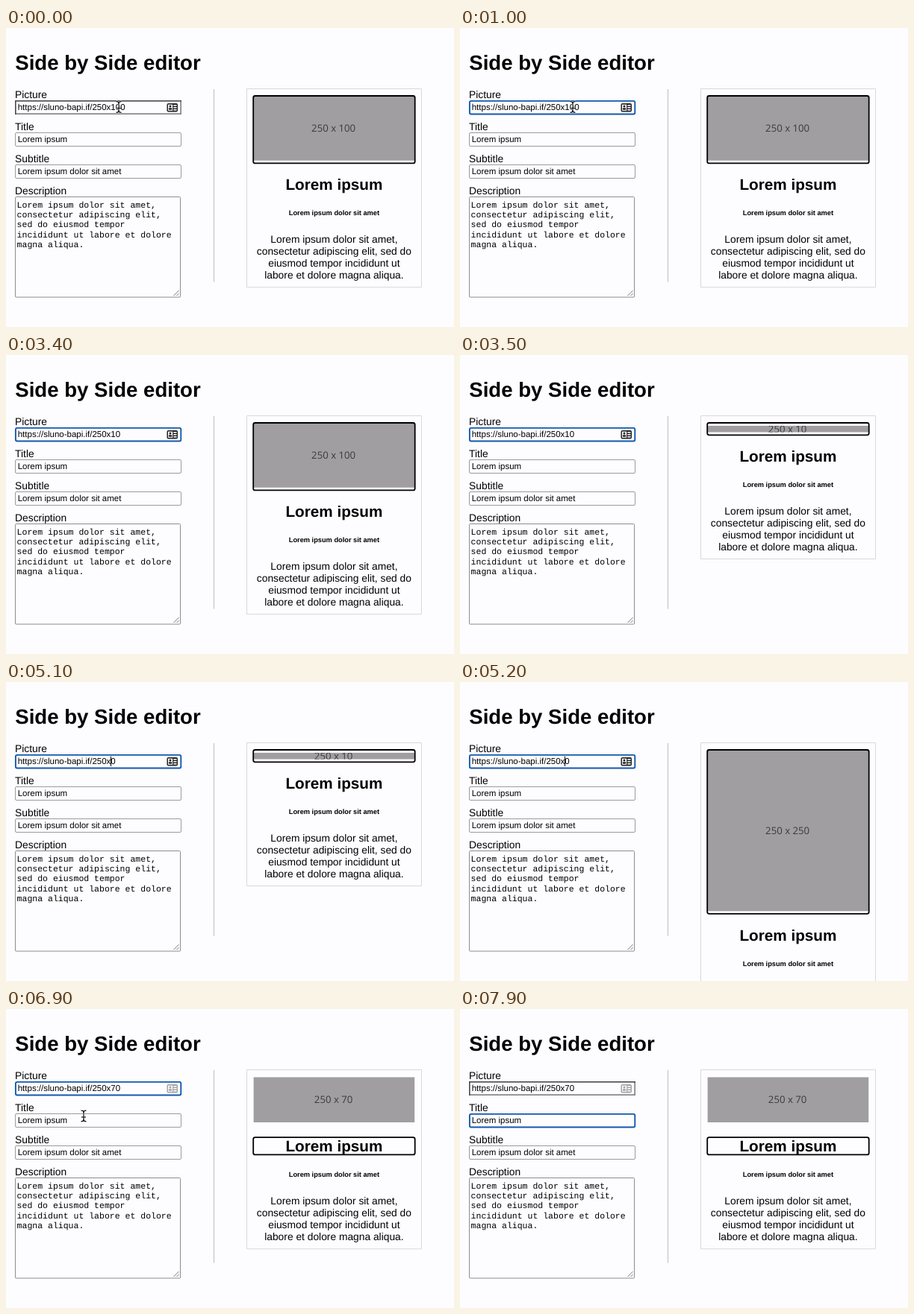
An HTML page with a canvas for the animation above (8 s loop, 600 by 401 pixels).

```html
<!DOCTYPE html>
<html lang="en">
<head>
<meta charset="utf-8">
<title>Side by Side editor</title>
<style>
  html, body { margin: 0; width: 100%; height: 100%; overflow: hidden; background: #fdfcfe; }
  canvas { display: block; }
</style>
</head>
<body>
<canvas id="stage" width="600" height="401"></canvas>
<script>
const ctx = document.getElementById('stage').getContext('2d');
ctx.textRendering = 'geometricPrecision';

const LOOP = 8000;
const SCALE = 0.8625;
const PAPER = '#fdfcfe';
const INK = '#000';
const SANS = '"Liberation Sans", Arial, sans-serif';
const MONO = '"Liberation Mono", "Courier New", monospace';
const PLACEHOLDER = '"Open Sans", "Noto Sans", sans-serif';
const FIELD_FONT = `11.5px ${SANS}`;
const URL_BASE = 'https://sluno-bapi.if/250x';
const TITLE = 'Lorem ipsum';
const SUBTITLE = 'Lorem ipsum dolor sit amet';

// Each track lists [start time, value] and holds its value until the next entry.
const sizeTrack = [[0, '100'], [2900, '10'], [5000, '0'], [5300, '70']];
const imageTrack = [[0, 100], [3500, 10], [5200, 250], [5500, 70]];
const focusTrack = [[0, ''], [100, 'picture'], [7400, 'title']];
const caretTrack = [[0, 1], [1900, 2], [2900, 1], [5000, 0], [5300, 1]];
const blinkTrack = [
  [0, false], [100, true], [600, false], [1100, true], [1600, false],
  [1900, true], [2400, false], [2900, true], [3400, false], [3900, true],
  [4400, false], [4900, true], [5800, false], [6300, true], [6800, false],
  [7400, true], [7900, false]
];
const mouseTrack = [
  [0, [151, 106]], [1900, null], [6700, [146, 111]], [6800, [124, 130]],
  [6900, [104, 143.5]], [7000, [100, 147]], [7100, [98, 148]], [7900, null]
];
const hoverTrack = [[0, 'picture'], [6800, 'title']];

function at(track, t) {
  let value = track[0][1];
  for (const [start, v] of track) if (t >= start) value = v;
  return value;
}

function text(str, x, y, font, align = 'left', color = INK) {
  ctx.font = font;
  ctx.textAlign = align;
  ctx.fillStyle = color;
  ctx.fillText(str, x, y);
}

function rect(x, y, w, h, color) {
  ctx.fillStyle = color;
  ctx.fillRect(x, y, w, h);
}

function outline(x, y, w, h, radius, color, width = 1) {
  ctx.beginPath();
  ctx.roundRect(x, y, w, h, radius);
  ctx.strokeStyle = color;
  ctx.lineWidth = width;
  ctx.stroke();
}

function line(x1, y1, x2, y2, color, width = 1) {
  ctx.beginPath();
  ctx.moveTo(x1, y1);
  ctx.lineTo(x2, y2);
  ctx.strokeStyle = color;
  ctx.lineWidth = width;
  ctx.stroke();
}

function insetBorder(x, y, w, h) {
  const b = 1.7;
  rect(x, y, w, h, '#858487');
  rect(x, y, w, b, '#4c4b4e');
  rect(x, y, b, h, '#4c4b4e');
  rect(x + b, y + b, w - 2 * b, h - 2 * b, PAPER);
}

function field(y, value, focused, inset) {
  if (focused) outline(12.9, y + 0.9, 221.4, 17.6, 2, '#1259ad', 1.9);
  else if (inset) insetBorder(12, y, 223, 19);
  else outline(12.5, y + 0.5, 222, 18, 1.5, '#9b9a9d');
  text(value, 15.7, y + 13.4, FIELD_FONT);
}

function caret(prefix, y) {
  ctx.font = FIELD_FONT;
  rect(15.7 + ctx.measureText(prefix).width - 0.4, y + 2.6, 1, 13.4, INK);
}

function contactIcon(active) {
  ctx.fillStyle = active ? '#222' : '#a3a2a5';
  ctx.beginPath();
  ctx.roundRect(215.5, 101, 14.5, 11.5, 2);
  ctx.fill();
  rect(217, 102.6, 6.2, 8.3, PAPER);
  ctx.fillStyle = active ? '#222' : '#a3a2a5';
  ctx.beginPath();
  ctx.arc(220, 105, 1.5, 0, 7);
  ctx.fill();
  ctx.beginPath();
  ctx.roundRect(217.8, 107.2, 4.6, 2.6, 1);
  ctx.fill();
  for (const y of [103, 106, 109]) rect(224.4, y, 4.2, 1.6, PAPER);
}

function textarea() {
  outline(12.5, 226.5, 221, 134.5, 1, '#8d8c8f');
  ['Lorem ipsum dolor sit amet,', 'consectetur adipiscing elit,', 'sed do eiusmod tempor',
   'incididunt ut labore et dolore', 'magna aliqua.'].forEach((row, i) =>
    text(row, 14.6, 240.5 + i * 13.4, `11.5px ${MONO}`));
  line(224.5, 359, 231.5, 352, '#777');
  line(228.5, 359, 231.5, 356, '#777');
}

function editor(t) {
  const focus = at(focusTrack, t);
  const size = at(sizeTrack, t);
  text('Side by Side editor', 12.3, 56.3, `bold 27.6px ${SANS}`);
  ['Picture', 'Title', 'Subtitle', 'Description'].forEach((label, i) =>
    text(label, 12.1, 94.2 + i * 43, `13.8px ${SANS}`));
  field(97, URL_BASE + size, focus === 'picture', true);
  field(140, TITLE, focus === 'title');
  field(183, SUBTITLE);
  contactIcon(at(hoverTrack, t) === 'picture');
  textarea();
  if (at(blinkTrack, t)) {
    if (focus === 'title') caret(TITLE, 140);
    else caret(URL_BASE + size.slice(0, at(caretTrack, t)), 97);
  }
  rect(278, 82, 1, 258.5, '#bdbcbf');
}

function preview(t) {
  const size = at(imageTrack, t);
  const hover = at(hoverTrack, t);
  const mid = 439.4;
  const top = 91.5;
  const imageHeight = size * SCALE;
  const boxHeight = Math.max(imageHeight + 3.4, 15.5);
  const bottom = top + boxHeight;
  const imageTop = bottom - 3.4 - imageHeight;

  outline(322.5, 81.5, 234, bottom + 85.5 + 81 - 81.5, 0, '#d9d8db');

  ctx.save();
  ctx.beginPath();
  ctx.rect(331.6, imageTop, 250 * SCALE, imageHeight);
  ctx.clip();
  rect(331, imageTop - 1, 218, imageHeight + 2, '#a09ea0');
  text(`250 x ${size}`, 438.6, imageTop + imageHeight / 2 + 4.7,
    `13.2px ${PLACEHOLDER}`, 'center', '#3b3a3c');
  ctx.restore();

  if (hover === 'picture') outline(331.2, top - 0.5, 216.5, boxHeight + 0.8, 2.5, INK, 1.8);
  else outline(331.2, bottom + 16.8, 216.5, 23.4, 2.5, INK, 1.8);

  text(TITLE, mid, bottom + 36, `bold 20.7px ${SANS}`, 'center');
  text(SUBTITLE, mid, bottom + 70.2, `bold 9.25px ${SANS}`, 'center');
  ['Lorem ipsum dolor sit amet,', 'consectetur adipiscing elit, sed do',
   'eiusmod tempor incididunt ut', 'labore et dolore magna aliqua.'].forEach((row, i) =>
    text(row, mid, bottom + 107.2 + i * 15.8, `13.8px ${SANS}`, 'center'));
}

function ibeam(x, y) {
  const strokes = (color, width) => {
    line(x, y - 6, x, y + 6, color, width);
    line(x - 3, y + 1.5, x + 3, y + 1.5, color, width);
    for (const side of [-1, 1]) {
      ctx.beginPath();
      ctx.moveTo(x - 3.5, y + side * 7.3);
      ctx.quadraticCurveTo(x - 0.5, y + side * 7.3, x, y + side * 5.5);
      ctx.quadraticCurveTo(x + 0.5, y + side * 7.3, x + 3.5, y + side * 7.3);
      ctx.stroke();
    }
  };
  strokes(PAPER, 2.6);
  strokes('#111', 1.2);
}

function draw(now) {
  const t = now % LOOP;
  rect(0, 0, 600, 401, PAPER);
  editor(t);
  preview(t);
  const mouse = at(mouseTrack, t);
  if (mouse) ibeam(...mouse);
  requestAnimationFrame(draw);
}

const start = performance.now();
requestAnimationFrame(() => draw(0));
draw = (paint => () => paint(performance.now() - start))(draw);
</script>
</body>
</html>
```
